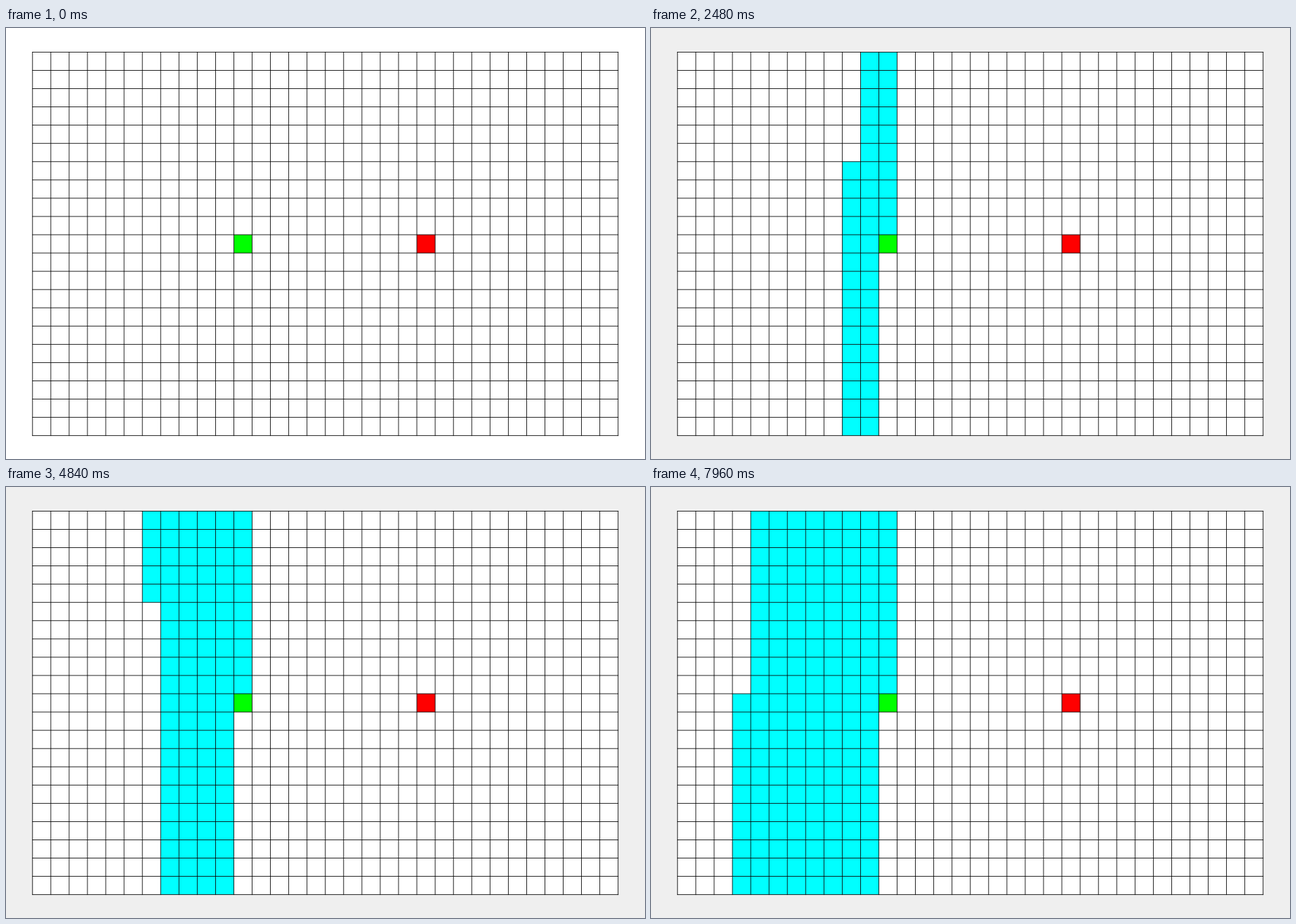
A matplotlib script that plays this animation: 910 by 615 pixels, repeating every 8000 ms.

```python
import numpy as np
import matplotlib.pyplot as plt
from matplotlib.animation import FuncAnimation
from matplotlib.collections import LineCollection, PolyCollection
from matplotlib.patches import Rectangle

WIDTH, HEIGHT, DPI = 910, 615, 100
LOOP_MS, STEP_MS = 8000, 20
COLS, ROWS = 32, 21
START, GOAL = (11, 10), (21, 10)

# Centres of the grid lines in pixels; they fall between whole pixels
CELL = 26.06
XS = 37.8 + CELL * np.arange(COLS + 1)
YS = 34.4 + CELL * np.arange(ROWS + 1)
LINE_PX = 0.85

FIRST_VISIT_MS = 420
VISIT_MS = 45.1
MARGIN_GREY = "#efefef"


def search_path():
    """Depth-first order: up from the start, then down and up, moving left."""
    col, row = START
    path = [(col, r) for r in reversed(range(row))]
    for c in reversed(range(col)):
        down = (col - c) % 2 == 1
        path += [(c, r) for r in (range(ROWS) if down else reversed(range(ROWS)))]
    return path


def cell_corners(cell):
    col, row = cell
    left, right = XS[col], XS[col + 1]
    top, bottom = YS[row], YS[row + 1]
    return [(left, top), (right, top), (right, bottom), (left, bottom)]


def visited_count(t):
    return max(0, int((t - FIRST_VISIT_MS) // VISIT_MS) + 1)


fig = plt.figure(figsize=(WIDTH / DPI, HEIGHT / DPI), dpi=DPI, facecolor="white")
ax = fig.add_axes([0, 0, 1, 1])
ax.set_xlim(0, WIDTH)
ax.set_ylim(HEIGHT, 0)
ax.axis("off")

margin = ax.add_patch(Rectangle((0, 0), WIDTH, HEIGHT, fc="white", lw=0))
ax.add_patch(Rectangle((XS[0], YS[0]), XS[-1] - XS[0], YS[-1] - YS[0],
                       fc="white", lw=0, snap=False))

path_cells = [cell_corners(cell) for cell in search_path()]
visited = PolyCollection([], facecolors="#00ffff", linewidths=0, zorder=2)
ends = PolyCollection([cell_corners(START), cell_corners(GOAL)],
                      facecolors=["#00ff00", "#ff0000"], linewidths=0, zorder=3)
lines = [[(x, YS[0]), (x, YS[-1])] for x in XS]
lines += [[(XS[0], y), (XS[-1], y)] for y in YS]
grid = LineCollection(lines, colors="black", linewidths=LINE_PX * 72 / DPI,
                      capstyle="projecting", zorder=4)
for artist in (visited, ends, grid):
    artist.set_snap(False)
    ax.add_collection(artist, autolim=False)


def update(frame):
    count = visited_count((frame + 0.5) * STEP_MS)
    margin.set_facecolor(MARGIN_GREY if count else "white")
    visited.set_verts(path_cells[:count])
    return margin, visited


anim = FuncAnimation(fig, update, frames=LOOP_MS // STEP_MS, interval=STEP_MS,
                     repeat=True, repeat_delay=0, blit=False)
plt.show()
```
